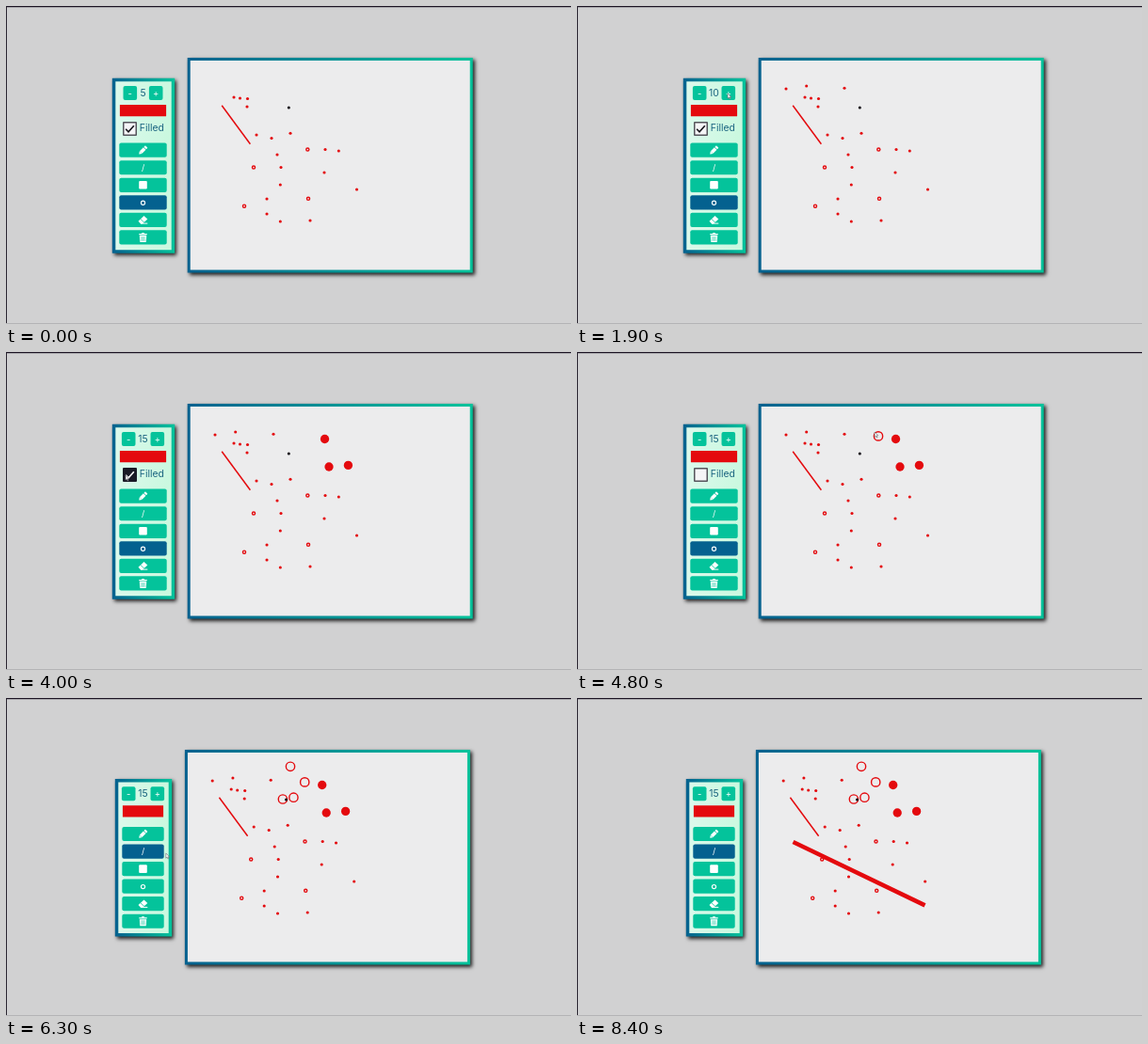
Write an HTML page with a canvas that moves like this. It is 600 by 338 pixels and loops after 9000 ms.

```html
<!DOCTYPE html>
<html lang="en">
<head>
<meta charset="utf-8">
<title>Drawing board</title>
<style>
  html, body { margin: 0; width: 100%; height: 100%; overflow: hidden; background: #d1d1d2; }
  canvas { display: block; width: 600px; height: 338px; }
</style>
</head>
<body>
<canvas id="stage"></canvas>
<script>
const LOOP = 9000, STEP = 100;
const RED = '#e40a0e', GREEN = '#04c39b', BLUE = '#04618f', INK = '#1b6480';
const FONT = 'Inter, "Open Sans", sans-serif';
const MID = 145.5, SHIFT = -2.8;
const canvas = document.getElementById('stage');
const ctx = canvas.getContext('2d');
const dpr = window.devicePixelRatio || 1;
canvas.width = 600 * dpr;
canvas.height = 338 * dpr;

// Marks on the board at the start
const dots = [[242, 97], [248.5, 98], [256.5, 98.5], [256, 107], [266, 137], [282, 140.5],
  [302, 135.3], [288, 158], [292, 171.5], [291.3, 190], [339, 152.5], [353.3, 154],
  [338, 177], [372.5, 195], [277, 205], [277, 221], [291.3, 229], [323, 228]];
const rings = [[320.3, 152.5], [263, 171.5], [253, 212.7], [321, 204.8]];

// The user's clicks: time, x, y, action. The pointer and all state follow from these.
const clicks = [
  [0, 256, 107, 'none'],
  [600, 243.7, 85, 'stamp'], [1200, 284, 87.3, 'stamp'], [1500, 222, 88, 'stamp'],
  [1800, 160, 93, 'plus'], [2100, 160, 93, 'plus'],
  [2700, 338.5, 92.5, 'stamp'], [2900, 343, 122, 'stamp'], [3200, 363.4, 120.4, 'stamp'],
  [4100, 127, 131, 'check'],
  [4700, 320, 89.4, 'stamp'], [5100, 304.8, 72.8, 'stamp'],
  [5400, 296.7, 107.5, 'stamp'], [5700, 308.2, 105.7, 'stamp'],
  [6100, 155, 168, 'tool'], [6900, 229.5, 153, 'press'], [7400, 369.5, 220.4, 'release']
];

function stateAt(t) {
  const s = { size: 5, filled: true, lineTool: false, marks: [], pen: null, stroke: null };
  const actions = {
    none() {},
    stamp: (x, y) => s.marks.push([x, y, s.size, s.filled]),
    plus() { s.size += 5; },
    check() { s.filled = false; },
    tool() { s.lineTool = true; },
    press(x, y) { s.pen = [x, y]; },
    release(x, y) { s.stroke = [...s.pen, x, y]; }
  };
  for (const [at, x, y, action] of clicks) if (t >= at) actions[action](x, y);
  s.pressed = s.filled && t >= 3900;
  return s;
}

function box(x, y, w, h, fill, r = 0) {
  ctx.fillStyle = fill;
  ctx.beginPath();
  ctx.roundRect(x, y, w, h, r);
  ctx.fill();
}

function poly(points, fill) {
  ctx.beginPath();
  points.forEach(([x, y]) => ctx.lineTo(x, y));
  ctx.closePath();
  ctx.fillStyle = fill;
  ctx.fill();
}

function line(x1, y1, x2, y2, width, color) {
  ctx.strokeStyle = color;
  ctx.lineWidth = width;
  ctx.beginPath();
  ctx.moveTo(x1, y1);
  ctx.lineTo(x2, y2);
  ctx.stroke();
}

function text(str, x, y, size, color, align = 'center') {
  ctx.font = `${size}px ${FONT}`;
  ctx.fillStyle = color;
  ctx.textAlign = align;
  ctx.fillText(str, x, y);
}

function across(x, w, from, to) {
  const g = ctx.createLinearGradient(x, 0, x + w, 0);
  g.addColorStop(0, from);
  g.addColorStop(1, to);
  return g;
}

function framed(x, y, w, h, edge, fill) {
  ctx.save();
  ctx.shadowColor = 'rgba(0,0,0,.85)';
  ctx.shadowBlur = 4 * dpr;
  ctx.shadowOffsetX = ctx.shadowOffsetY = 2 * dpr;
  box(x, y, w, h, across(x, w, BLUE, GREEN));
  ctx.restore();
  box(x + edge, y + edge, w - 2 * edge, h - 2 * edge, fill);
}

const icons = {
  pencil() {
    ctx.rotate(-Math.PI / 4);
    box(-3.2, -1.8, 5.6, 3.6, '#fff');
    box(3, -1.8, 2.2, 3.6, '#fff', .7);
    poly([[-3.4, -1.8], [-3.4, 1.8], [-6, 0]], '#fff');
  },
  line() { text('/', 0, 3.2, 9, '#fff'); },
  square() { box(-4.3, -4.3, 8.6, 8.6, '#fff', 1); },
  circle() {
    ctx.beginPath();
    ctx.arc(0, .4, 2.1, 0, Math.PI * 2);
    ctx.strokeStyle = '#fff';
    ctx.lineWidth = 1.1;
    ctx.stroke();
  },
  eraser() {
    poly([[-5, 1.3], [1, -4.3], [4.8, -.8], [-.4, 4], [-2.5, 4]], '#fff');
    line(-2.6, -.9, 1.4, 2.8, .8, GREEN);
    box(-2.5, 3.2, 7.3, 1, '#fff');
  },
  trash() {
    box(-4.3, -4, 8.6, 1.2, '#fff', .4);
    box(-1.5, -4.9, 3, 1.2, '#fff', .4);
    poly([[-3.7, -2.1], [3.7, -2.1], [3.2, 5], [-3.2, 5]], '#fff');
    for (const x of [-1.7, 0, 1.7]) line(x, -.9, x, 3.9, .6, GREEN);
  }
};

function checkbox({ filled, pressed }) {
  box(124, 123, 15, 15, pressed ? '#191a26' : '#55555c', 1);
  if (!pressed) box(125.5, 124.5, 12, 12, '#f5f5f7');
  if (filled) {
    ctx.strokeStyle = pressed ? '#fff' : '#15151b';
    ctx.lineWidth = 1.6;
    ctx.beginPath();
    ctx.moveTo(127.2, 130.8);
    ctx.lineTo(130, 133.7);
    ctx.lineTo(135.8, 127.2);
    ctx.stroke();
  }
  text('Filled', 141.8, 133, 10.4, INK, 'left');
}

function panel(s) {
  const half = s.lineTool ? 30.2 : 33.2;
  const top = s.lineTool ? 86 : 76.7;
  const x = MID + .5 - half;
  framed(x, top, half * 2, s.lineTool ? 167.5 : 186, 3.5, across(x, half * 2, '#dcf9ec', '#c8f8de'));

  const gap = s.size < 10 ? 13.7 : 15.3;
  const row = top + 15.7;
  for (const [sign, side] of [['-', -1], ['+', 1]]) {
    const cx = MID + side * gap;
    box(cx - 7.3, row - 7.5, 14.6, 15, GREEN, 2);
    text(sign, cx, row + 3.2, 9.5, '#fff');
  }
  text(s.size, MID, row + 3.6, 10.4, INK);

  const wide = half - 8;
  box(MID - wide + .6, top + 28.2, wide * 2 - 1.2, 12.4, RED);
  if (!s.lineTool) checkbox(s);

  const active = s.lineTool ? 'line' : 'circle';
  Object.keys(icons).forEach((name, i) => {
    const cy = (s.lineTool ? 144.5 : 153.2) + i * 18.55;
    box(MID - wide, cy - 7.6, wide * 2, 15.2, name === active ? BLUE : GREEN, 2);
    ctx.save();
    ctx.translate(MID, cy);
    icons[name]();
    ctx.restore();
  });
}

function mark(x, y, size, filled, color = RED) {
  ctx.fillStyle = ctx.strokeStyle = color;
  ctx.lineWidth = 1.4;
  ctx.beginPath();
  ctx.arc(x, y, size * .31, 0, Math.PI * 2);
  filled ? ctx.fill() : ctx.stroke();
}

function board(s) {
  ctx.save();
  if (s.lineTool) ctx.translate(SHIFT, 0);
  framed(192.7, 55, 303, 228.5, 3, '#ececed');
  line(229.2, 105.8, 259.4, 146.8, 1.5, RED);
  dots.forEach(([x, y]) => mark(x, y, 5, true));
  rings.forEach(([x, y]) => mark(x, y, 5, false));
  s.marks.forEach(m => mark(...m));
  mark(300.3, 108, 5, true, '#141018');
  ctx.restore();
  if (s.stroke) line(...s.stroke, 4.6, RED);
}

// Eases to each click, arriving one step early
function pointer(t) {
  const i = clicks.findIndex(c => c[0] > t);
  if (t < STEP || i < 0) return;
  const [t0, x0, y0] = clicks[i - 1], [t1, x1, y1] = clicks[i];
  const p = Math.min(1, (t - t0) / (t1 - t0 - STEP));
  const k = p * p * (3 - 2 * p);
  ctx.save();
  ctx.translate(x0 + (x1 - x0) * k, y0 + (y1 - y0) * k);
  poly([[0, 0], [0, 5.2], [1.3, 4.1], [2.2, 6], [3, 5.6], [2.2, 3.8], [3.8, 3.6]], '#fafafa');
  ctx.strokeStyle = '#66666c';
  ctx.lineWidth = .6;
  ctx.stroke();
  ctx.restore();
}

function draw(t) {
  const s = stateAt(t);
  ctx.setTransform(dpr, 0, 0, dpr, 0, 0);
  box(0, 0, 600, 338, '#d1d1d2');
  box(0, 0, 600, 1.3, '#1d1524');
  box(0, 0, 1, 338, '#2a2530');
  box(0, 337, 600, 1, '#b4b4b6');
  panel(s);
  board(s);
  pointer(t);
}

const start = performance.now();
function tick() {
  const t = (performance.now() - start) % LOOP;
  draw(Math.floor(t / STEP) * STEP);
  requestAnimationFrame(tick);
}
tick();
</script>
</body>
</html>
```
